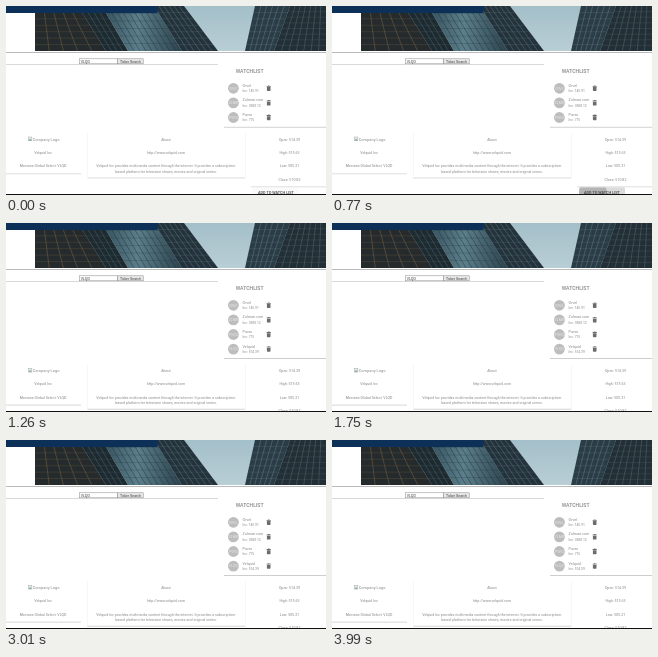
Write an HTML page that moves like this. It is 320 by 189 pixels and loops after 4.06 s.

```html
<!DOCTYPE html>
<html lang="en">
<head>
<meta charset="utf-8">
<title>Stock watchlist</title>
<style>
html, body { margin: 0; width: 100%; height: 100%; overflow: hidden; background: #fff; }
svg { display: block; width: 320px; height: 189px; }
text { font-family: Roboto, "Liberation Sans", sans-serif; fill: #868686; }
.mid { text-anchor: middle; }
.field { font-family: "Liberation Sans", sans-serif; fill: #333; }
</style>
</head>
<body>
<svg id="stage" viewBox="0 0 320 189" xmlns="http://www.w3.org/2000/svg">
  <defs>
    <linearGradient id="sky" x2="0" y2="1">
      <stop stop-color="#a3bfc9"/><stop offset="1" stop-color="#b9ced5"/>
    </linearGradient>
    <linearGradient id="glass" x2="1" y2="0">
      <stop stop-color="#34505c"/><stop offset=".45" stop-color="#5b7f8b"/><stop offset="1" stop-color="#2c424c"/>
    </linearGradient>
    <clipPath id="heroClip"><path d="M29 0H320V45H29Z"/></clipPath>
    <clipPath id="buttonClip"><rect x="247" y="181.5" width="46" height="10" rx="1"/></clipPath>
    <filter id="soft" x="-10%" y="-10%" width="120%" height="125%">
      <feDropShadow dx="0" dy=".6" stdDeviation=".7" flood-color="#000" flood-opacity=".32"/>
    </filter>
  </defs>
  <rect width="320" height="189" fill="#fff"/>
  <g clip-path="url(#heroClip)">
    <rect x="29" width="291" height="45" fill="url(#sky)"/>
    <g id="towers"></g>
  </g>
  <path d="M0 0H151.5V7H0Z" fill="#0d3058"/>
  <path d="M0 46.5H320" stroke="#a9a9a9" stroke-width=".8"/>
  <path d="M0 58.5H212" stroke="#c9c9c9" stroke-width=".7"/>
  <rect x="73.5" y="52.8" width="37.8" height="5" fill="#fff" stroke="#888" stroke-width=".5"/>
  <rect x="111.6" y="52.8" width="25.6" height="5" fill="#e8e8e8" stroke="#888" stroke-width=".5"/>
  <text class="field" x="74.7" y="56.6" font-size="3.4">VLQD</text>
  <text class="field mid" x="124.4" y="56.6" font-size="3.4">Ticker Search</text>

  <g id="details"></g>
  <rect id="panel" x="218" y="50" width="106" height="70.7" fill="#fff" filter="url(#soft)"/>
  <path d="M216 46.9H320V58H216Z" fill="#fff"/>
  <text x="229.7" y="66.8" font-size="5.1" font-weight="500">WATCHLIST</text>
  <g id="list"></g>
  <path d="M0 188.5H320" stroke="#111"/>
</svg>
<script>
const NS = 'http://www.w3.org/2000/svg';
const $ = id => document.getElementById(id);
const LOOP = 4060, HOVER = 700, PRESS = 770, ADDED = 840;

function add(parent, tag, attrs, label) {
  const el = document.createElementNS(NS, tag);
  for (const key in attrs) el.setAttribute(key, attrs[key]);
  if (label) el.textContent = label;
  parent.appendChild(el);
  return el;
}

// A facade: corners run top left, top right, bottom right, bottom left.
function tower([a, b, c, d], fill, ink, cols, rows) {
  const mix = (p, q, k) => [p[0] + (q[0] - p[0]) * k, p[1] + (q[1] - p[1]) * k];
  const line = (p, q) => `M${p}L${q}`;
  add($('towers'), 'path', { d: `M${a}L${b}L${c}L${d}Z`, fill });
  let uprights = '', floors = '';
  for (let i = 1; i < cols; i++) uprights += line(mix(a, b, i / cols), mix(d, c, i / cols));
  for (let i = 1; i < rows; i++) floors += line(mix(a, d, i / rows), mix(b, c, i / rows));
  const style = { fill: 'none', stroke: ink, 'stroke-width': .7 };
  add($('towers'), 'path', { d: uprights, ...style, opacity: .6 });
  add($('towers'), 'path', { d: floors, ...style, opacity: .3 });
}

tower([[29, 0], [72, 0], [100, 45], [29, 45]], '#252b2c', '#8a7150', 5, 7);
tower([[72, 0], [96, 0], [122, 45], [100, 45]], '#1d2a30', '#58717a', 4, 7);
tower([[96, 0], [148, 0], [176, 45], [122, 45]], 'url(#glass)', '#1c2b33', 9, 6);
tower([[148, 0], [178, 0], [212, 45], [176, 45]], '#24333b', '#6b848d', 6, 7);
tower([[249, 0], [284, 0], [268, 45], [239, 45]], '#2a3c45', '#728d97', 6, 7);
tower([[284, 0], [320, 0], [320, 45], [268, 45]], '#222f36', '#66767a', 7, 8);

// Company cards, which slide down when the list grows.
const details = $('details');
[[-4, 79, 167.2], [81.3, 158, 171.3], [245, 90, 180.2]].forEach(([x, width, bottom]) =>
  add(details, 'rect', { x, y: 122, width, height: bottom - 122, fill: '#fff', filter: 'url(#soft)' }));
add(details, 'rect', { x: -5, y: 118, width: 330, height: 9, fill: '#fff' });

add(details, 'rect', { x: 22.3, y: 131, width: 3.6, height: 3.8, fill: '#e3edf4', stroke: '#999', 'stroke-width': .4 });
add(details, 'path', { d: 'M22.6 134.5l1.5-1.8 1.6 1.8z', fill: '#7ba873' });
add(details, 'text', { x: 26.7, y: 134.6, 'font-size': 4 }, 'Company Logo');

[
  [37, 148, 'Velquid Inc'],
  [37, 161.4, 'Morvane Global Select: VLQD'],
  [160, 134.5, 'About'],
  [160, 148, 'http://www.velquid.com'],
  [160, 161.4, 'Velquid Inc provides multimedia content through the internet. It provides a subscription-'],
  [160, 166.8, 'based platform for television shows, movies and original series.'],
  [283.5, 134.5, 'Open: 514.39'],
  [283.5, 148, 'High: 515.63'],
  [283.5, 161.4, 'Low: 505.21'],
  [283.5, 174.8, 'Close: 510.82']
].forEach(([x, y, label]) => add(details, 'text', { x, y, class: 'mid', 'font-size': 3.6 }, label));

const button = add(details, 'rect', { x: 247, y: 181.5, width: 46, height: 10, rx: 1, filter: 'url(#soft)' });
const ripple = add(details, 'circle', { cx: 261, cy: 187, r: 14, fill: '#b4b4b4', 'clip-path': 'url(#buttonClip)' });
const caption = add(details, 'text', { x: 270, y: 188, class: 'mid', 'font-size': 3.8, 'font-weight': 500 }, 'ADD TO WATCH LIST');
caption.style.fill = '#444';

const rows = [
  ['Orvel', '145.91', 'ORVL'],
  ['Zulmari.com', '3580.12', 'ZLMR'],
  ['Pavro', '715', 'PVRO'],
  ['Velquid', '514.39', 'VLQD']
].map(([name, price, code], i) => {
  const row = add($('list'), 'g', { transform: `translate(0 ${82.3 + i * 14.6})` });
  add(row, 'circle', { cx: 227.4, r: 5.4, fill: '#bdbdbd' });
  const tag = add(row, 'text', { x: 227.4, y: 1.3, class: 'mid', 'font-size': 3.6 }, code);
  tag.style.fill = '#e6e6e6';
  add(row, 'text', { x: 236.6, y: -1.5, 'font-size': 3.7 }, name);
  add(row, 'text', { x: 236.6, y: 3.9, 'font-size': 3.3 }, `Inc: ${price}`);
  add(row, 'path', { d: 'M260.6-2.4h1l.5-.5h1.2l.5.5h1v.8h-4.2zM260.9-1.2h3.6V2q0 .7-.7.7h-2.2q-.7 0-.7-.7z', fill: '#6c6c6c' });
  return row;
});

function draw(t) {
  const added = t >= ADDED;
  details.setAttribute('transform', `translate(0 ${added ? 14.3 : 0})`);
  $('panel').setAttribute('height', added ? 85 : 70.7);
  rows[3].style.display = added ? '' : 'none';
  button.setAttribute('fill', t < HOVER ? '#fafafa' : '#dcdcdc');
  ripple.style.display = t >= PRESS && !added ? '' : 'none';
}

function frame() {
  draw(performance.now() % LOOP);
  requestAnimationFrame(frame);
}
frame();
</script>
</body>
</html>
```
